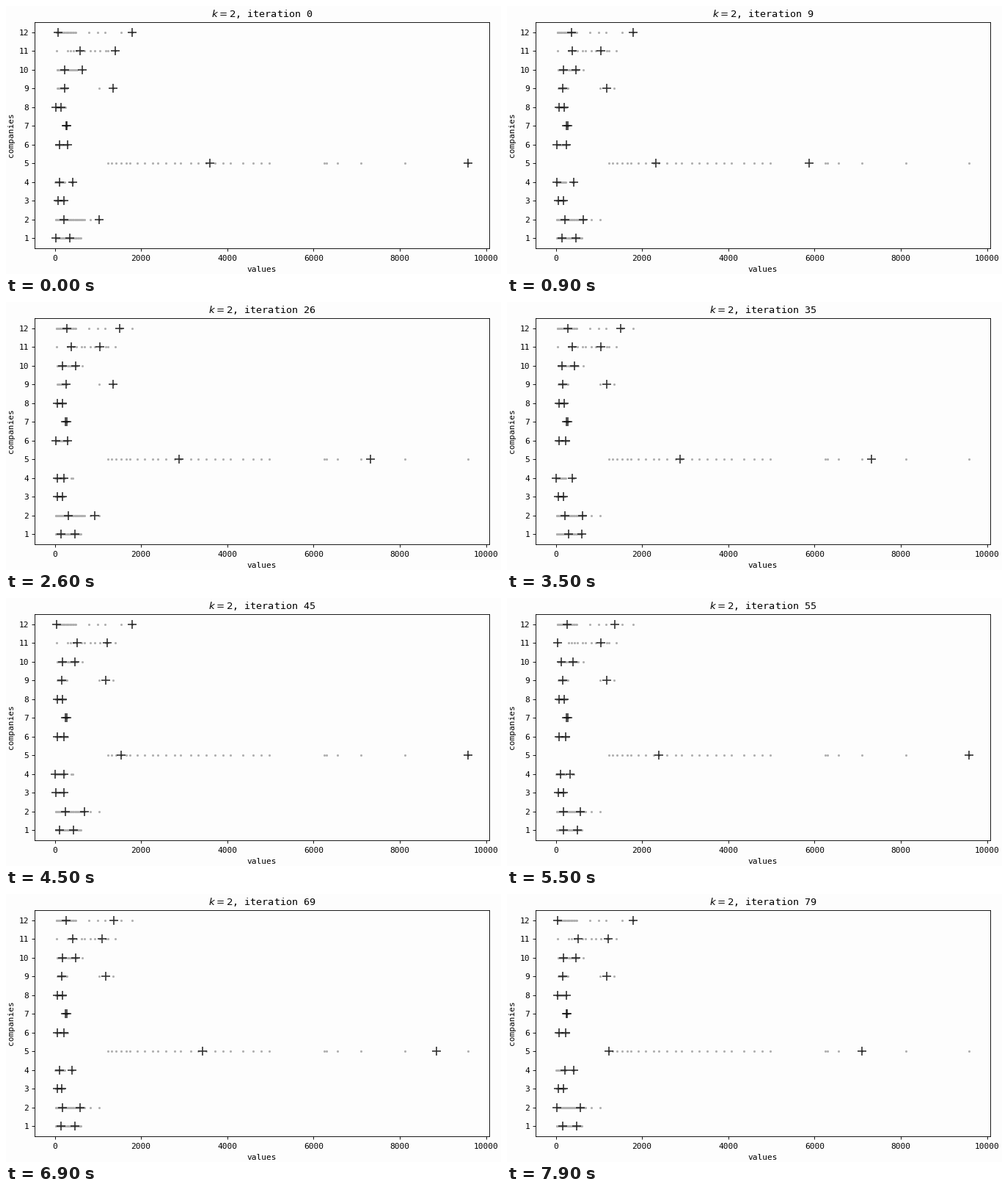
These frames come from a looping animation (675x365 px, 8000 ms). A matplotlib script:

```python
import numpy as np
import matplotlib.pyplot as plt
from matplotlib.animation import FuncAnimation

W, H, DPI = 675, 365, 80
FRAMES, STEP = 80, 100
PAPER, DOT, INK = "#fdfdfd", "#b0b0b0", "#111111"

plt.rcParams["font.family"] = "DejaVu Sans Mono"
rng = np.random.default_rng(4)


def spread(lo, hi, n, bend=1.3, loose=()):
    """A run of values that thins out towards hi, plus a few loose ones."""
    u = np.linspace(0, 1, n)
    u[1:-1] += rng.uniform(-0.3, 0.3, n - 2) / n
    return np.concatenate([lo + (hi - lo) * u ** bend, loose])


# Values of each company, with the value its first run starts from.
rows = [
    (spread(20, 610, 30), 340),
    (spread(25, 680, 42, loose=[820, 1035]), 205),
    (spread(20, 215, 20), 80),
    (spread(15, 230, 24, loose=[375, 410]), 102),
    (spread(1235, 4970, 23, loose=spread(6255, 9590, 6, 2.5)), 3605),
    (spread(25, 295, 24), 105),
    (spread(245, 280, 8), 262),
    (spread(25, 240, 18), 148),
    (spread(65, 280, 10, loose=[1030, 1350]), 222),
    (spread(55, 520, 18, loose=[640]), 222),
    (spread(305, 1395, 12, loose=[50]), 590),
    (spread(35, 490, 24, loose=spread(785, 1800, 5)), 80),
]


def seed(x, first):
    """Pair a value with the one farthest from it."""
    far = x[np.argmax(np.abs(x - first))]
    return min(first, far), max(first, far)


def update(x, pair):
    low = x <= np.mean(pair)
    return x[low].mean(), x[~low].mean()


def run(x, start):
    """Two-means, seeded again each time it settles."""
    pair = seed(x, start)
    path = [pair]
    while len(path) < FRAMES:
        moved = update(x, pair)
        pair = seed(x, rng.choice(x)) if np.allclose(moved, pair) else moved
        path.append(pair)
    return path


paths = np.array([run(x, start) for x, start in rows])
levels = np.arange(1, len(rows) + 1)

fig = plt.figure(figsize=(W / DPI, H / DPI), dpi=DPI, facecolor=PAPER)
ax = fig.add_axes([39 / W, 35 / H, 620 / W, 308 / H], facecolor=PAPER)
ax.set_xlim(-468, 10076)
ax.set_ylim(0.45, 12.55)
ax.set_yticks(levels)
ax.tick_params(axis="x", pad=5)
ax.set_xlabel("values")
ax.set_ylabel("companies", labelpad=5)
title = ax.set_title("", pad=6.5)

for y, (x, _) in zip(levels, rows):
    ax.plot(x, np.full(len(x), y), "o", color=DOT, ms=2.8, mew=0)
centres, = ax.plot([], [], "+", color=INK, ms=10, mew=1.5, alpha=0.85,
                   zorder=3)


def draw(t):
    centres.set_data(paths[:, t].ravel(), np.repeat(levels, 2))
    title.set_text(f"$k=2$, iteration {t}")
    return centres, title


anim = FuncAnimation(fig, draw, frames=FRAMES, interval=STEP, repeat=True,
                     repeat_delay=0)
plt.show()
```
